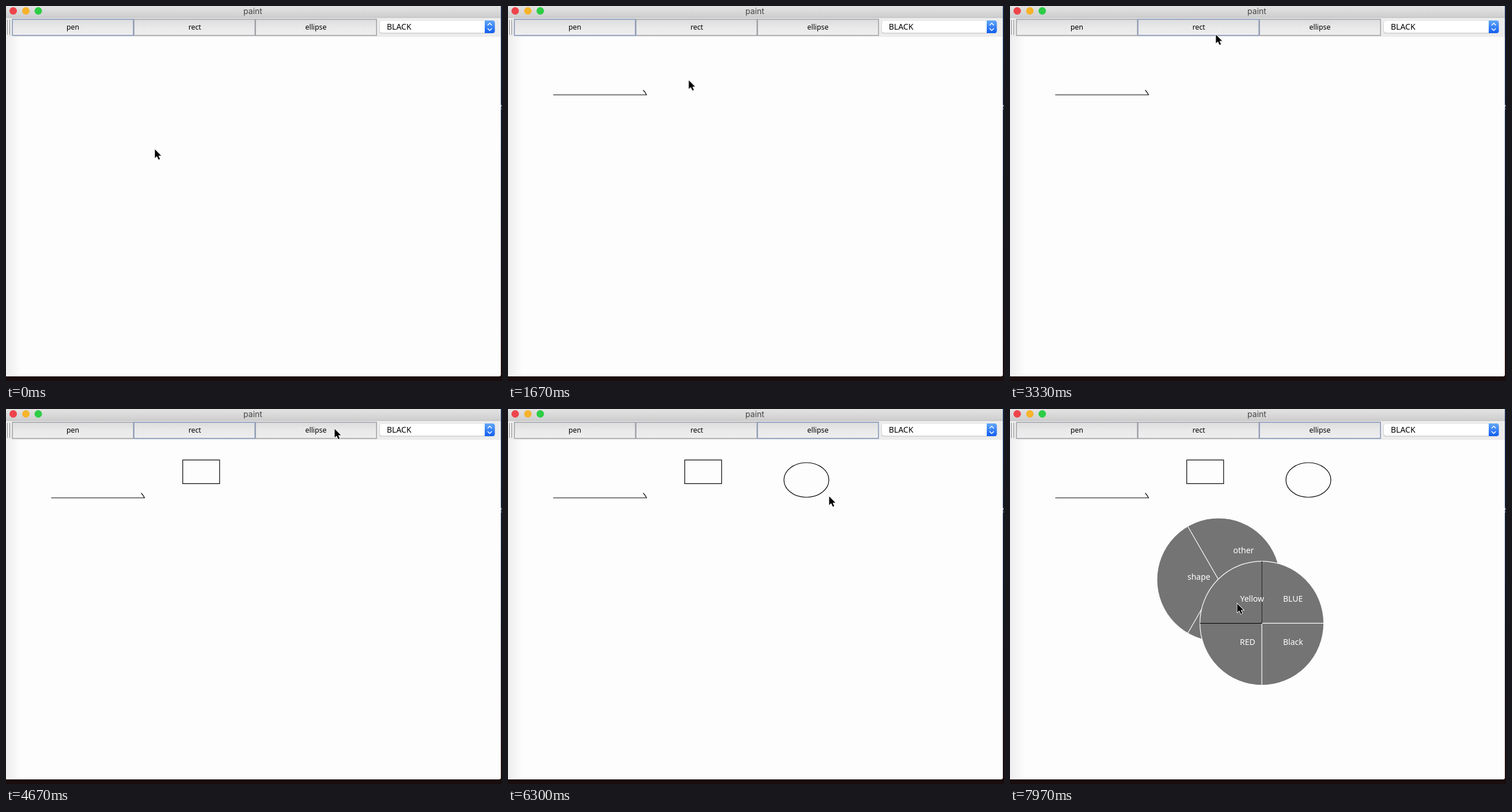
Animation of 861x650 px, one loop 8 s. Source, as an HTML page:

```html
<!DOCTYPE html>
<html lang="en">
<head>
<meta charset="utf-8">
<title>paint</title>
<style>
html, body { margin: 0; width: 100%; height: 100%; overflow: hidden; background: #fdfdfd; }
svg { display: block; width: 100%; height: 100%; }
text { font: 14px "Noto Sans", "Open Sans", sans-serif; }
.title { font: 14px Inter, Roboto, sans-serif; fill: #454545; text-anchor: middle; }
.label text { font-size: 12.3px; font-weight: 500; text-anchor: middle; }
.button { fill: url(#face); stroke: #9b9ca2; stroke-width: 1.4; }
.focus { fill: none; stroke: #8da0c6; stroke-width: 1.4; }
.ink { fill: none; stroke: #000; stroke-width: 1.2; }
.pie circle { fill: #747474; stroke: #fff; stroke-width: 1.2; }
.pie path { fill: none; stroke: #fff; stroke-width: 1.2; }
.pie text { fill: #fff; }
.pie .hover { stroke: #000; }

.anim { animation: 8s ease-in-out infinite; }
.toggle { animation: 8s step-end infinite; }
#cursor { animation-name: travel; }
#line { stroke-dasharray: 1 2; animation-name: line; }
#rect { animation-name: rect; }
#oval { animation-name: oval; }
#penFocus { animation-name: pen-focus; }
#rectFocus { animation-name: rect-focus; }
#ovalFocus { animation-name: oval-focus; }
#menu { animation-name: menu; }
#submenu { animation-name: submenu; }
#hover { animation-name: hover; }

@keyframes travel {
  0%, .8% { transform: translate(258px, 248px); }
  9.8%, 11.3% { transform: translate(118px, 41px); }
  14.4%, 15% { transform: translate(78px, 154px); }
  18.75% { transform: translate(240px, 154px); }
  19.5% { transform: translate(235px, 146px); animation-timing-function: ease-in; }
  21.25% { transform: translate(350px, 120px); animation-timing-function: ease-out; }
  30.6%, 32% { transform: translate(716px, 51px); }
  39.8%, 40.4% { transform: translate(345px, 40px); }
  41.5% { transform: translate(357px, 49px); }
  46%, 46.6% { transform: translate(307px, 88px); }
  51.25%, 52.4% { transform: translate(370px, 129px); }
  58.3%, 61.5% { transform: translate(570px, 34px); }
  71.25%, 73% { transform: translate(479px, 93px); }
  78.1%, 83.75% { transform: translate(557px, 151px); }
  87.3%, 88% { transform: translate(362px, 296px); }
  90.6%, 91.2% { transform: translate(437px, 371px); }
  94% { transform: translate(379px, 341px); }
  99.5%, 100% { transform: translate(394px, 337px); }
}
@keyframes line {
  0%, 15% { stroke-dashoffset: 1; }
  18.75% { stroke-dashoffset: .056; }
  19.5%, 100% { stroke-dashoffset: 0; }
}
@keyframes rect {
  0%, 46.6% { width: 0; height: 0; }
  51.25%, 100% { width: 64px; height: 41px; }
}
@keyframes oval {
  0%, 73% { cx: 479px; cy: 93px; rx: 0; ry: 0; }
  78.1%, 100% { cx: 518px; cy: 123px; rx: 39px; ry: 30px; }
}
@keyframes pen-focus { 0% { opacity: 1; } 40%, 100% { opacity: 0; } }
@keyframes rect-focus { 0% { opacity: 0; } 40% { opacity: 1; } 59.5%, 100% { opacity: 0; } }
@keyframes oval-focus { 0% { opacity: 0; } 59.5%, 100% { opacity: 1; } }
@keyframes menu { 0% { opacity: 0; } 87.6%, 100% { opacity: 1; } }
@keyframes submenu { 0% { opacity: 0; } 90.9%, 100% { opacity: 1; } }
@keyframes hover { 0% { opacity: 0; } 91.8%, 100% { opacity: 1; } }
</style>
</head>
<body>
<svg viewBox="0 0 861 650">
  <defs>
    <linearGradient id="bar" x2="0" y2="1">
      <stop stop-color="#e3e3e3"/><stop offset="1" stop-color="#cecece"/>
    </linearGradient>
    <linearGradient id="face" x2="0" y2="1">
      <stop stop-color="#dcdcde"/><stop offset=".5" stop-color="#e9e9e9"/><stop offset="1" stop-color="#eeeeee"/>
    </linearGradient>
    <linearGradient id="edge">
      <stop stop-color="#ededed"/><stop offset=".35" stop-color="#f3f3f3"/><stop offset="1" stop-color="#fdfdfd"/>
    </linearGradient>
    <linearGradient id="blue" x2="0" y2="1">
      <stop stop-color="#62a8f8"/><stop offset="1" stop-color="#105df2"/>
    </linearGradient>
    <linearGradient id="desk" x2="0" y2="1">
      <stop stop-color="#172a4b"/><stop offset=".6" stop-color="#111525"/><stop offset="1" stop-color="#210d0c"/>
    </linearGradient>
  </defs>

  <rect width="861" height="650" fill="url(#desk)"/>
  <rect y="641" width="861" height="9" fill="#190d0d"/>
  <text x="855" y="179" style="font-size:11px" fill="#c5cad4">2</text>
  <path d="M0 0H859V639Q859 642 856 642H0Z" fill="#fdfdfd"/>
  <rect y="53" width="26" height="589" fill="url(#edge)"/>

  <rect width="859" height="20" fill="url(#bar)"/>
  <rect y="20" width="859" height="33.5" fill="#ececec"/>
  <path d="M0 20H859" stroke="#b8b8b8"/>
  <circle cx="12.5" cy="8.5" r="6.5" fill="#ee444b"/>
  <circle cx="34.5" cy="8.5" r="6.5" fill="#f5b32c"/>
  <circle cx="56" cy="8.5" r="6.5" fill="#2dcd45"/>
  <text class="title" x="428.5" y="14">paint</text>

  <path d="M2.5 24V50M6.5 24V50" stroke="#8c8c8c"/>
  <g class="label">
    <rect class="button" x="11.2" y="23" width="210" height="28"/>
    <rect class="button" x="222.2" y="23" width="210" height="28"/>
    <rect class="button" x="433.2" y="23" width="210" height="28"/>
    <rect id="penFocus" class="focus toggle" x="11.2" y="23" width="210" height="28"/>
    <rect id="rectFocus" class="focus toggle" x="222.2" y="23" width="210" height="28"/>
    <rect id="ovalFocus" class="focus toggle" x="433.2" y="23" width="210" height="28"/>
    <text x="116" y="41">pen</text>
    <text x="327.7" y="41">rect</text>
    <text x="538" y="41">ellipse</text>
  </g>

  <rect x="648.5" y="25.5" width="200" height="22" rx="4" fill="#bdbdbd"/>
  <rect x="649" y="25.5" width="199" height="21" rx="4" fill="#fff"/>
  <path d="M831 25H844.5Q848.5 25 848.5 29V43Q848.5 47 844.5 47H831Z" fill="url(#blue)"/>
  <path d="M836 33.5L839.7 29.8L843.4 33.5M836 38.8L839.7 42.5L843.4 38.8" fill="none" stroke="#fff" stroke-width="1.5"/>
  <text x="661" y="41">BLACK</text>

  <path id="line" class="ink anim" pathLength="1" d="M78.5 154H240.5Q238 149 234.7 145.8"/>
  <rect id="rect" class="ink anim" x="306.8" y="88.4"/>
  <ellipse id="oval" class="ink anim"/>

  <g id="menu" class="pie toggle">
    <circle cx="362" cy="296" r="107"/>
    <path d="M308.5 203.3L362 296L308.5 388.7M362 296H469"/>
    <text x="387.5" y="249.5">other</text>
    <text x="308" y="296">shape</text>
    <text x="387.5" y="342">color</text>
  </g>
  <g id="submenu" class="pie toggle">
    <circle cx="437.2" cy="371.3" r="107.5"/>
    <path d="M329.7 371.3H544.7M437.2 263.8V478.8"/>
    <path id="hover" class="hover toggle" d="M329.7 371.3H437.2V263.8"/>
    <text x="399.5" y="333.5">Yellow</text>
    <text x="474" y="333.5">BLUE</text>
    <text x="399" y="409">RED</text>
    <text x="474" y="409">Black</text>
  </g>

  <path id="cursor" class="anim" d="M.5 .5V15.5L4 12.3L6.8 18.3L9.3 17.2L6.6 11.4H11.4Z"
        stroke="#fff" stroke-width="1.6" paint-order="stroke"/>
</svg>
</body>
</html>
```
